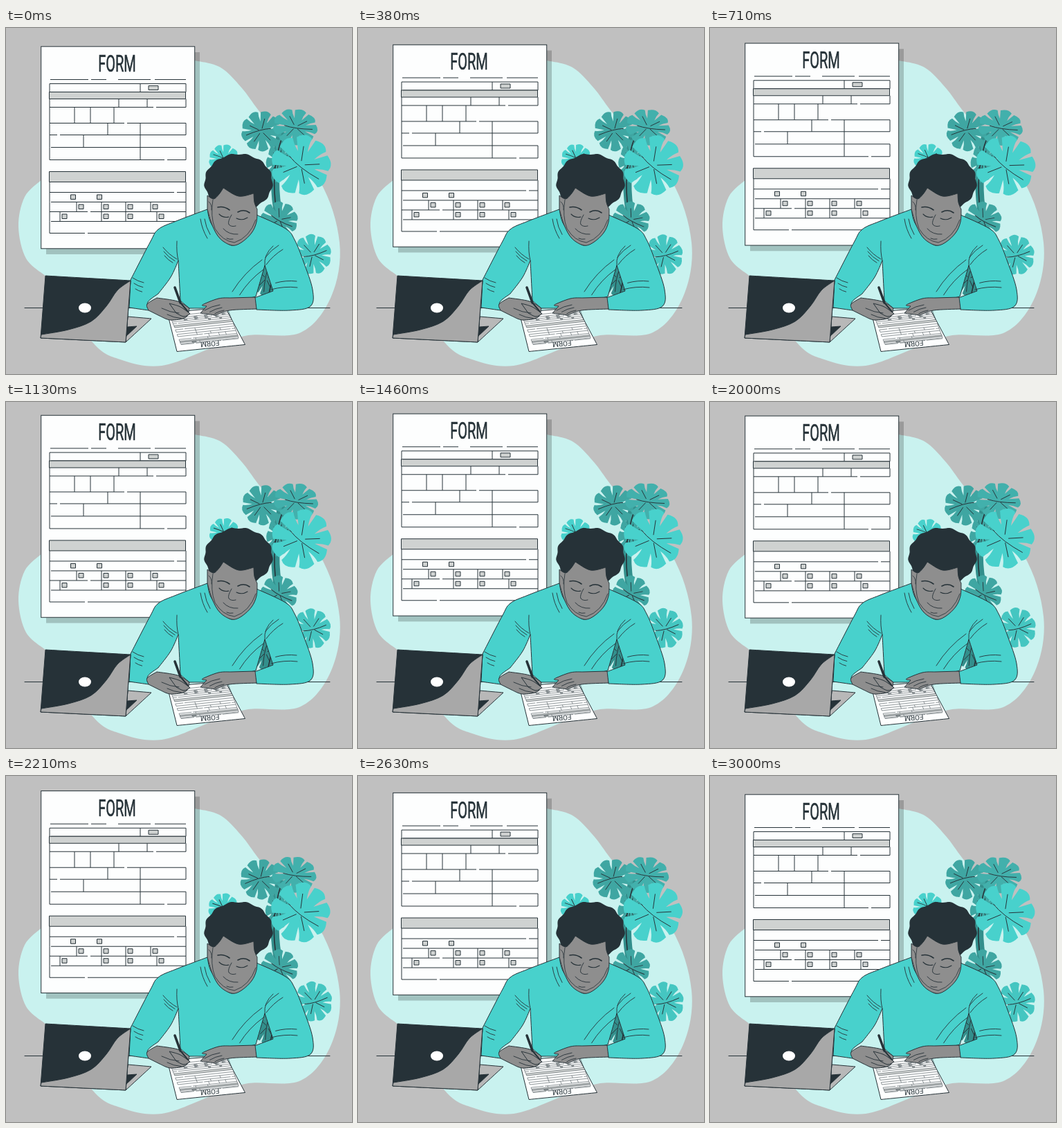
An HTML page that plays this animation: 500 px wide and 500 px high, repeating every 3.04 s.

```html
<!DOCTYPE html>
<html lang="en">
<head>
<meta charset="utf-8">
<title>Filling in a form</title>
<style>
  html, body { margin: 0; width: 100%; height: 100%; overflow: hidden; background: #c0c0c0; }
  svg { display: block; width: 100vw; height: 100vh; }
  text { font-family: Roboto, sans-serif; text-anchor: middle; fill: #263238; }
  .line { fill: none; stroke: #263238; stroke-linecap: round; }
  #fields * { vector-effect: non-scaling-stroke; }
</style>
</head>
<body>
<svg id="stage" viewBox="0 0 500 500"></svg>
<script>
const INK = '#263238', TEAL = '#48d1cc', DEEP = '#3fa6a2', SKIN = '#8e8e8e', PALE = '#c9f2ef';
const range = n => [...Array(n).keys()];

// Smooth path through key points; "|" marks a corner, a final "z" closes it.
function smooth(text) {
  let last, out = '';
  for (const part of text.replace('z', '').split('|')) {
    const p = part.trim().split(/\s+/).map(q => q.split(',').map(Number));
    if (last) p.unshift(last); else out = 'M' + p[0];
    for (let i = 0; i < p.length - 1; i++) {
      const b = p[i], c = p[i + 1], a = p[i - 1] || b, e = p[i + 2] || c;
      const near = b.map((v, k) => v + (c[k] - a[k]) / 6);
      const far = c.map((v, k) => v - (e[k] - b[k]) / 6);
      out += `C${near} ${far} ${c}`;
    }
    last = p[p.length - 1];
  }
  return out + (text.endsWith('z') ? 'Z' : '');
}

const shape = (points, fill, stroke = INK) =>
  `<path d="${smooth(points)}" fill="${fill}" stroke="${stroke}" stroke-linejoin="round"/>`;
const line = (d, width = 1) => `<path class="line" d="${d}" stroke-width="${width}"/>`;
const box = (x, y, w, h, fill = '#cfd2d1') => `<rect x="${x}" y="${y}" width="${w}" height="${h}" fill="${fill}"/>`;

// n bowed creases side by side, each a little shorter than the one before.
const folds = (x, y, dx, dy, n, gapX, gapY) => line(range(n).map(i => {
  const s = 1 - i * .2;
  return `M${x + i * gapX},${y + i * gapY}q${(dx * .5 - dy * .1) * s},${(dy * .5 + dx * .1) * s} ${dx * s},${dy * s}`;
}).join(''), .9);

// Split leaf, tip pointing up before it is turned.
function leaf(x, y, rx, ry, turn, fill) {
  const at = (deg, r) => {
    const a = deg * Math.PI / 180;
    return [rx * r * Math.sin(a), -ry * r * Math.cos(a)].map(v => v.toFixed(1));
  };
  const lobes = 9, step = 360 / lobes;
  let d = 'M' + at(180, .35), veins = `M${at(180, .5)}Q${rx * .12},0 ${at(0, .8)}`;
  for (let i = 0; i < lobes; i++) {
    const a = -180 + i * step, b = a + step;
    d += `L${at(a + 3, .98)}Q${at(a + step * .55, 1.16)} ${at(b - 5, .98)}`
      + `Q${at(b - 7, .75)} ${at(b, i === lobes - 1 ? .35 : .5)}`;
    if (i % 2) veins += `M${at(a + step / 2, .15)}L${at(a + step / 2, .65)}`;
  }
  return `<g transform="translate(${x},${y}) rotate(${turn})"><path d="${d}Z" fill="${fill}"/>${line(veins, .9)}</g>`;
}

// Form: each row has a top edge, its dividers and a small gap in the rule below.
const rows = [
  { y: 80.5, to: 92.5, cuts: [194] },
  { y: 102.5, to: 114.5, cuts: [163, 204], gap: 215 },
  { y: 114.5, to: 137.5, cuts: [99, 122, 156], gap: 173, open: true },
  { y: 137.5, to: 154.5, cuts: [147, 194], gap: 76 },
  { y: 154.5, to: 172.5, cuts: [112, 194], open: true },
  { y: 172.5, to: 190.5, cuts: [194], gap: 231 },
  { y: 222.5, to: 237.5, gap: 245 },
  { y: 237.5, to: 251.5, boxes: [93.5, 131.5] },
  { y: 251.5, to: 265.5, boxes: [105, 141, 176, 212], gap: 120 },
  { y: 265.5, to: 279.5, boxes: [81, 141, 176, 221] },
  { y: 279.5, to: 296.5, gap: 116 }
];
const drawRow = ({ y, to, cuts = [], boxes = [], gap = 63, open }) => {
  const dividers = boxes.length > 2 ? boxes.map(x => x - 3) : cuts;
  const walls = [63, ...dividers, ...(open ? [] : [260])];
  return `<path d="${walls.map(x => `M${x},${y}V${to}`).join('')}M63,${to}H${gap - 2 + (gap === 63) * 2}M${gap + 2},${to}H260"/>`
    + boxes.map(x => box(x, y + 3.5, 7, 6.5)).join('');
};
const fields = `<g id="fields" stroke="${INK}" fill="none">
  <path d="M64,74.5H119M123,74.5H145M162,74.5H209M215,74.5H260M63,80.5H260"/>
  ${rows.map(drawRow).join('')}
  ${box(62.5, 92.5, 197, 10)}${box(62.5, 207.5, 197, 15)}${box(206, 83.5, 14, 6)}
</g>`;
const form = `<g id="form">
  ${box(58, 35, 222, 292, '#0003')}
  <rect x="50.7" y="26.800" width="222" height="292" fill="#fdfefe" stroke="${INK}"/>
  ${fields}
  <text transform="translate(160.5,63) scale(.62,1)" font-size="32.3" stroke="${INK}" stroke-width=".6">FORM</text>
</g>`;

const blob = shape('52,219 27,244 18,287 29,333 57,358|124,453 165,479 225,488 300,461 350,444 426,440 470,388 482,310 452,219 374,130 341,87 310,57 273,47z', PALE, 'none');

const plant = `<g id="plant">
  <path d="M398,150Q384,210 392,260T374,384" fill="none" stroke="#338f8c" stroke-width="12"/>
  ${leaf(376, 362, 20, 24, 190, '#338f8c')}
  ${leaf(395, 192, 18, 30, 190, DEEP)}
  ${line('M399,158Q384,200 389,250Q399,300 380,384', 1.6)}
  ${leaf(315, 190, 21, 21, -65, TEAL)}
  ${leaf(369, 149, 28, 28, -105, DEEP)}
  ${leaf(418, 143, 25, 31, 98, '#42b0ac')}
  ${leaf(395, 277, 25, 26, 118, DEEP)}
  ${leaf(426, 198, 42, 41, 128, TEAL)}
  ${leaf(443, 327, 28, 26, 75, '#45c6c1')}
</g>`;

const laptop = shape('176,417|210,420|173,454z', '#b8b8b8')
  + shape('175,432|189,431|174,445z', INK)
  + shape('57,358|180,365|173,454|50,448z', INK)
  + shape('180,365|161,379 145,402 123,424 90,436 51,443|50,448|173,454z', '#a8a8a8')
  + '<ellipse cx="114" cy="404.5" rx="9" ry="7" fill="#fff"/>';

const shirt = shape(
  '291,262|246,279 220,291 208,310 180,364|178,404|206,408|205,396 220,384|238,360 249,336|252,394|265,405|300,405|361,388|374,343|386,380|359,390|362,407|410,408 440,402 443,378 430,338 417,306 404,290 362,270|356,293 326,314 298,285 291,262z', TEAL)
  + line('M249,336Q246,324 247,308M374,343Q372,328 386,315', .9)
  + folds(281, 276, 10, 28, 2, 6, 0)
  + folds(227, 317, 20, 17, 3, 1, 6)
  + folds(400, 320, -24, 22, 2, -6, -6)
  + folds(370, 335, -43, 46, 2, 2, 14)
  + folds(183, 361, 16, 7, 3, 2, 8)
  + folds(421, 375, -38, 3, 2, -1, -9);

// Curly hair: an ellipse with a rippled edge.
const curls = range(120).map(i => {
  const a = i * Math.PI / 60, r = 1 + .022 * Math.sin(13 * a);
  return `${(336 + 49 * r * Math.cos(a)).toFixed(1)},${(223 + 41 * r * Math.sin(a)).toFixed(1)}`;
}).join(' ');

const head = `<polygon points="${curls}" fill="${INK}"/>`
  + shape('291,242|300,247 308,240 314,231|336,243 358,239|359,252 363,262|362,280 355,296 340,310 326,314 309,304 298,285 291,262z', SKIN)
  + line('M299,248Q295,272 302,290Q313,308 330,310Q352,303 361,277M293,251Q298,255 297,263', .8)
  + line('M306,259Q315,257 323,263M335,266Q344,261 352,267', 1.6)
  + line('M308,269Q314,275 322,273M333,275Q341,279 349,274', 1.1)
  + line('M326,270Q320,280 322,284Q326,288 332,286M314,290Q322,299 335,298M319,304Q323,306 328,305', .9);

const paper = shape('233,411|317,404|345.5,457.5|247,467.5z', '#fdfefe')
  + '<use href="#fields" transform="translate(345,457) matrix(-.425,.045,-.07,-.185,0,0) translate(-51,-27)" stroke-width=".5"/>'
  + '<text transform="translate(294.5,453) rotate(174)" font-size="10">FORM</text>';

const hands = shape('206,408|204,399 218,390|248,395 265,405|260,418 238,422 222,416z', SKIN)
  + line('M244,375L252,397', 3.6) + line('M252,397L263,410', 2)
  + shape('236,398|252,403 266,413|257,417 246,412z', SKIN)
  + folds(225, 405, 25, 7, 2, 8, 9)
  + shape('360,389|362,406|323,408 303,415|281,412|290,402|284,400 307,391 325,390z', SKIN)
  + folds(309, 400, -22, 8, 3, 3, 4);

document.getElementById('stage').innerHTML =
  blob + line('M27,404.5H468') + form + plant + shirt + head + paper + hands + laptop;

const formNode = document.getElementById('form'), plantNode = document.getElementById('plant');

// Triangle wave: 0 at the start, 1 half way.
const wave = p => 1 - Math.abs(1 - 2 * (p % 1));

function frame(now) {
  const p = now % 3040 % 3000 / 3000;
  formNode.setAttribute('transform', `translate(0,${-10 * wave(p)})`);
  plantNode.setAttribute('transform', `rotate(${2 * wave(p + .25) - 1},381,251)`);
  requestAnimationFrame(frame);
}
requestAnimationFrame(frame);
</script>
</body>
</html>
```
